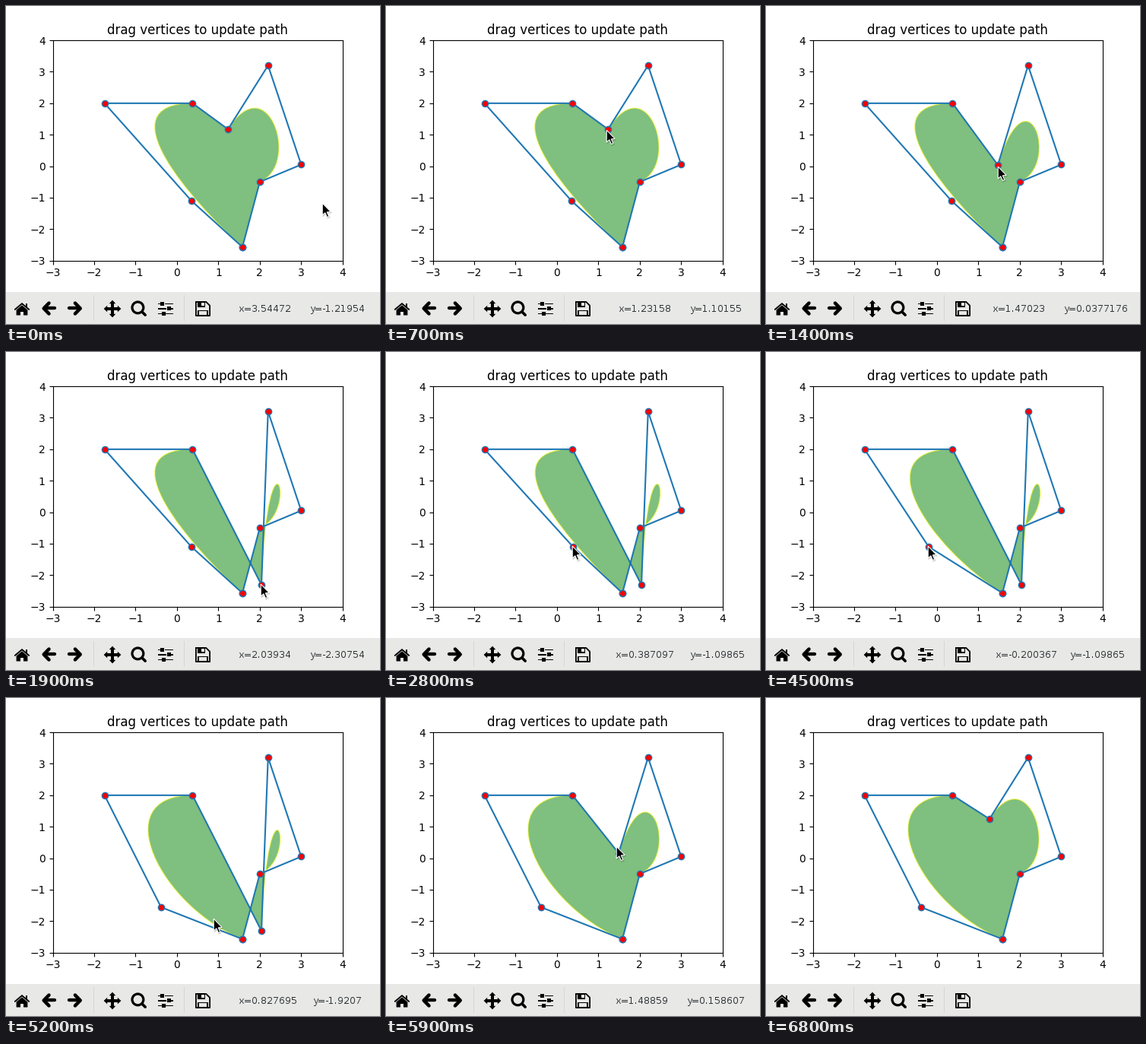
A matplotlib script that plays this animation: 492 by 418 pixels, repeating every 7.5 s.

```python
import numpy as np
import matplotlib as mpl
import matplotlib.pyplot as plt
from matplotlib.animation import FuncAnimation
from matplotlib.patches import Circle, PathPatch, Polygon, Rectangle
from matplotlib.path import Path
from matplotlib.text import Text

W, H, PLOT_H, DPI = 492, 418, 376, 100
FRAMES, INTERVAL = 75, 100
PT = 72 / DPI  # points per pixel
BAR, INK, TEXT = "#e8e8e7", "black", "#2e3436"

# Plot box in pixels, y measured downwards
LEFT, RIGHT = 0.125 * W, 0.9 * W
TOP, BOTTOM = 0.12 * PLOT_H, 0.89 * PLOT_H

VERTICES = np.array([
    (1.58, -2.57), (0.35, -1.1), (-1.75, 2.0), (0.375, 2.0), (1.232, 1.174),
    (2.2, 3.2), (3.0, 0.05), (2.0, -0.5), (1.58, -2.57)])
CODES = ([Path.MOVETO] + [Path.CURVE4] * 3 + [Path.LINETO]
         + [Path.CURVE4] * 3 + [Path.CLOSEPOLY])

# Pointer moves: start and end time in frames, then where it goes
START = (423, 265)
MOVES = [
    (-1, 7.4, (291, 164)),
    (11, 19, (336, 306)),
    (20, 25, (236, 266)),
    (26, 28, (246, 256)),
    (28, 33.4, (363, 181)),
    (41, 45, (214, 256)),
    (45, 48, (204, 275)),
    (49, 55, (336, 306)),
    (57, 60.16, (293.5, 159)),
    (66, 68, (335, 360)),
]
# Vertex index, first and last frame in which the pointer holds it
DRAGS = [(4, 12, 19), (1, 28, 48), (4, 58, 64)]
LEAD = 0.12  # the arrow runs a little ahead of the reported position
GONE = 68


def pointer(t):
    pos = np.array(START, float)
    for t0, t1, goal in MOVES:
        u = np.clip((t - t0) / (t1 - t0), 0, 1)
        pos += (np.array(goal) - pos) * u * u * (3 - 2 * u)
    return np.rint(pos)


def to_data(p):
    return np.array([(p[0] - LEFT) / (RIGHT - LEFT) * 7 - 3,
                     (BOTTOM - p[1]) / (BOTTOM - TOP) * 7 - 3])


def vertices_at(f):
    v = VERTICES.copy()
    for index, first, last in DRAGS:
        if f >= first:
            v[index] = to_data(pointer(min(f, last)))
    return v


class PixelText(Text):
    """Text with glyph advances rounded to whole pixels, as in a toolbar."""

    def draw(self, renderer):
        with mpl.rc_context({"text.hinting_factor": 1,
                             "text.hinting": "default"}):
            super().draw(renderer)


mpl.rcParams.update({"font.family": "DejaVu Sans", "toolbar": "None",
                     "text.kerning_factor": 6})
fig = plt.figure(figsize=((W + 1e-6) / DPI, (H + 1e-6) / DPI), dpi=DPI,
                 facecolor="white")
ax = fig.add_axes([0.125, (H - BOTTOM) / H, 0.775, (BOTTOM - TOP) / H])
ax.set(xlim=(-3, 4), ylim=(-3, 4), xticks=range(-3, 5), yticks=range(-3, 5))
ax.set_title("drag vertices to update path")

shape = PathPatch(Path(VERTICES, CODES), facecolor="green",
                  edgecolor="yellow", alpha=0.5, zorder=5)
ax.add_patch(shape)
outline, = ax.plot([], [], marker="o", markerfacecolor="r", zorder=6)

ui = fig.add_axes([0, 0, 1, 1], zorder=10)
ui.set(xlim=(0, W), ylim=(H, 0))
ui.axis("off")


def stroke(points, width, join="round"):
    x, y = zip(*points)
    ui.plot(x, y, color=INK, lw=width * PT, solid_capstyle="round",
            solid_joinstyle=join)


def fill(points, color=INK):
    ui.add_patch(Polygon(points, fc=color, lw=0, zorder=3))


def box(x, y, half_w, half_h, color=INK):
    ui.add_patch(Rectangle((x - half_w, y - half_h), 2 * half_w, 2 * half_h,
                           fc=color, lw=0, zorder=3))


def home_icon(x, y):
    stroke([(x - 9.2, y + 0.9), (x, y - 6.8), (x + 9.2, y + 0.9)], 1.9,
           "miter")
    box(x + 6.2, y - 4.2, 1.2, 3.2)
    fill([(x - 7.4, y + 1.5), (x, y - 4.6), (x + 7.4, y + 1.5),
          (x + 7.4, y + 8.5), (x - 7.4, y + 8.5)])
    box(x, y + 6.1, 1.7, 2.5, BAR)


def arrow_icon(x, y, side):
    stroke([(x + side * 0.2, y - 7), (x + side * 7, y),
            (x + side * 0.2, y + 7)], 4.5)
    stroke([(x - side * 7.4, y), (x + side * 5, y)], 4.4)


def move_icon(x, y):
    box(x, y, 8, 1.65)
    box(x, y, 1.65, 8)
    for dx, dy in ((1, 0), (-1, 0), (0, 1), (0, -1)):
        fill([(x + 11.4 * dx, y + 11.4 * dy),
              (x + 6.8 * dx + 4.3 * dy, y + 6.8 * dy + 4.3 * dx),
              (x + 6.8 * dx - 4.3 * dy, y + 6.8 * dy - 4.3 * dx)])


def zoom_icon(x, y):
    stroke([(x + 4, y + 4), (x + 8.2, y + 8.2)], 3.6)
    ui.add_patch(Circle((x - 1.6, y - 1.6), 7.4, fill=False, ec=INK,
                        lw=3.2 * PT))


def sliders_icon(x, y):
    for dy, knob in ((-6.5, -4.2), (0, 4.2), (6.5, -2.5)):
        box(x, y + dy, 10, 0.85)
        box(x + knob, y + dy, 2.9, 2.5, BAR)
        box(x + knob, y + dy, 2.4, 2.5)


def save_icon(x, y):
    r = 9.1
    stroke([(x - r, y - r), (x + 4.2, y - r), (x + r, y - 4.2),
            (x + r, y + r), (x - r, y + r), (x - r, y - r)], 1.8)
    box(x - 1.65, y - 5.6, 4.95, 3.9)
    box(x, y - 5.85, 1.7, 2.15, BAR)
    box(x, y + 5.35, 6.6, 3.65)
    box(x, y + 5.8, 5, 2.5, BAR)


ui.add_patch(Rectangle((0, PLOT_H), W, H - PLOT_H, fc=BAR, lw=0, zorder=0))
for x in (115.5, 234.5):
    box(x, 397, 0.5, 17, "#d6d6d4")
home_icon(21, 398)
arrow_icon(56.7, 397.5, -1)
arrow_icon(90.7, 397.5, 1)
move_icon(140, 398)
zoom_icon(175, 398)
sliders_icon(210, 398)
save_icon(259, 398)

readouts = [PixelText(0, 402, "", color=TEXT, fontsize=12 * PT,
                      va="baseline") for _ in "xy"]
for label in readouts:
    ui.add_artist(label)

ARROW = np.array([(0, 0), (0, 16), (3.6, 12.7), (6.2, 18.5), (8.6, 17.4),
                  (6.1, 11.8), (11, 11.4)]) - (0.8, 0.9)
shadow = Polygon(ARROW, fc="black", ec="black", lw=2 * PT, alpha=0.13,
                 zorder=20)
arrow = Polygon(ARROW, fc="black", ec="white", lw=1.1 * PT, zorder=21)
ui.add_patch(shadow)
ui.add_patch(arrow)


def advance(text):
    """Width in whole pixels of a padded label such as 'x=1.5    '."""
    digits = sum(c.isdigit() for c in text)
    return 17 + 8 * digits + 4 * (len(text) - 2 - digits)


def show_readout(p):
    # The padded labels end together near the right border
    right = W - 3
    for label, name, value in reversed(list(zip(readouts, "xy", to_data(p)))):
        text = f"{name}={value:<12.6g}" + " " * (name == "x")
        right -= advance(text)
        label.set_text(text.rstrip())
        label.set_x(right)


def update(f):
    v = vertices_at(f)
    shape.set_path(Path(v, CODES))
    outline.set_data(v[:, 0], v[:, 1])

    for artist in (arrow, shadow, *readouts):
        artist.set_visible(f < GONE)
    tip = pointer(f + LEAD)
    arrow.set_xy(ARROW + tip)
    shadow.set_xy(ARROW + tip + (0.8, 1.2))
    show_readout(pointer(f))
    return shape, outline, arrow, shadow, *readouts


anim = FuncAnimation(fig, update, frames=FRAMES, interval=INTERVAL,
                     repeat=True, repeat_delay=0, blit=False)
plt.show()
```
